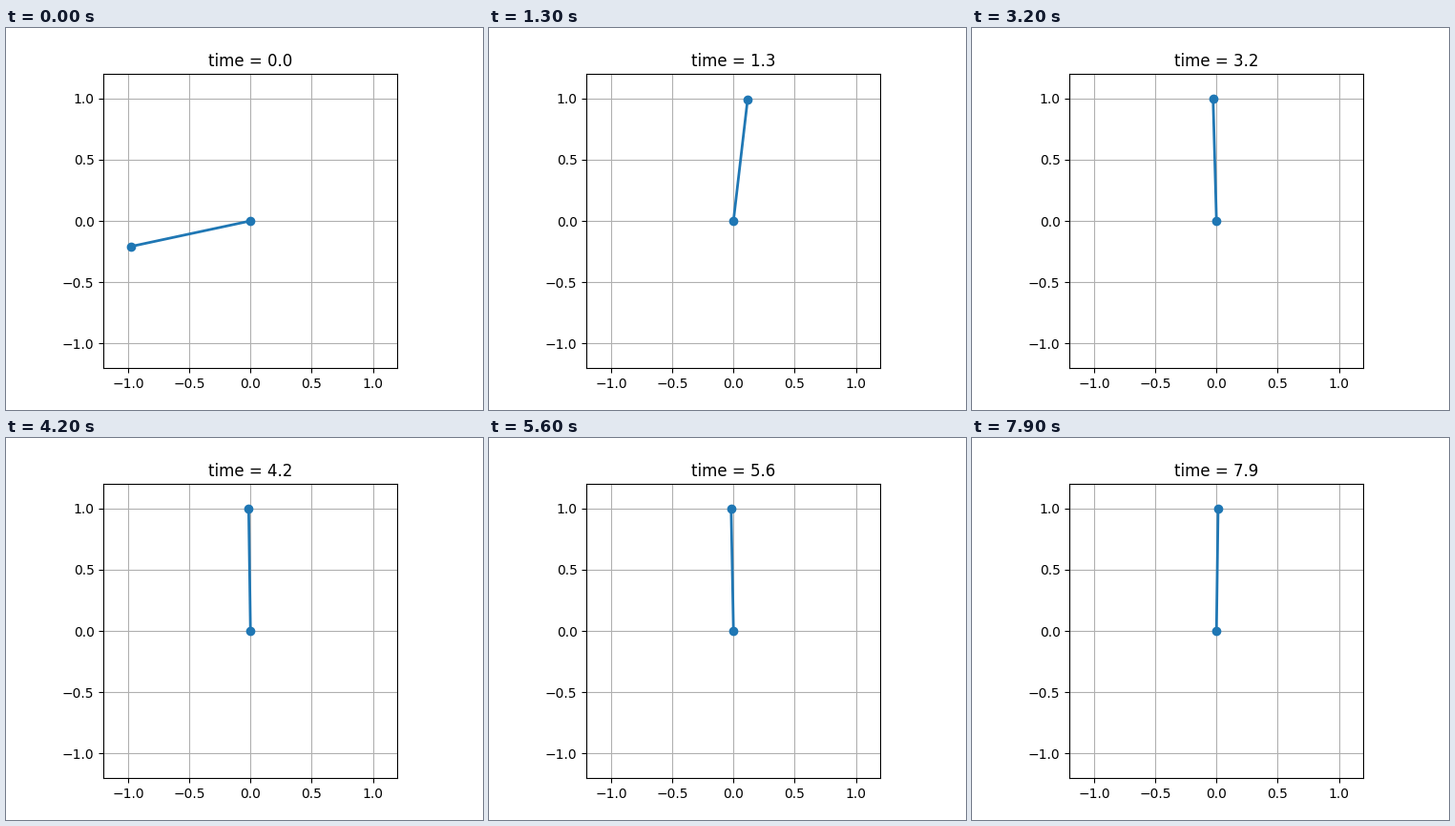
Recreate the animation shown at these times as a matplotlib script. Size 500 by 400 pixels, loop 8 s.

```python
import matplotlib.pyplot as plt
import numpy as np
from matplotlib.animation import FuncAnimation

FRAMES = 80
INTERVAL = 100  # ms


def swing_up(t):
    """Logistic approach from the low side to upright."""
    return 5.5 / (1 + np.exp(4.03 * (t - 0.3824)))


def sway(t):
    """Small wobble while balancing, plus a slow fall to the right."""
    wobble = -0.024 - 0.010 * np.cos(2 * np.pi * (t - 1.9) / 1.6)
    return wobble + 0.044 * np.exp(1.6 * (t - 8))


fig, ax = plt.subplots(figsize=(5, 4), dpi=100)
ax.set_xlim(-1.2, 1.2)
ax.set_ylim(-1.2, 1.2)
ax.set_aspect("equal")
ax.grid()
rod, = ax.plot([], [], "o-", lw=2)
title = ax.set_title("time = 0.0")


def update(i):
    t = i * INTERVAL / 1000
    lean = swing_up(t) + sway(t)  # clockwise from upright
    rod.set_data([0, np.sin(lean)], [0, np.cos(lean)])
    title.set_text(f"time = {t:.1f}")
    return rod, title


anim = FuncAnimation(fig, update, frames=FRAMES, interval=INTERVAL,
                     repeat=True, repeat_delay=0)
plt.show()
```
